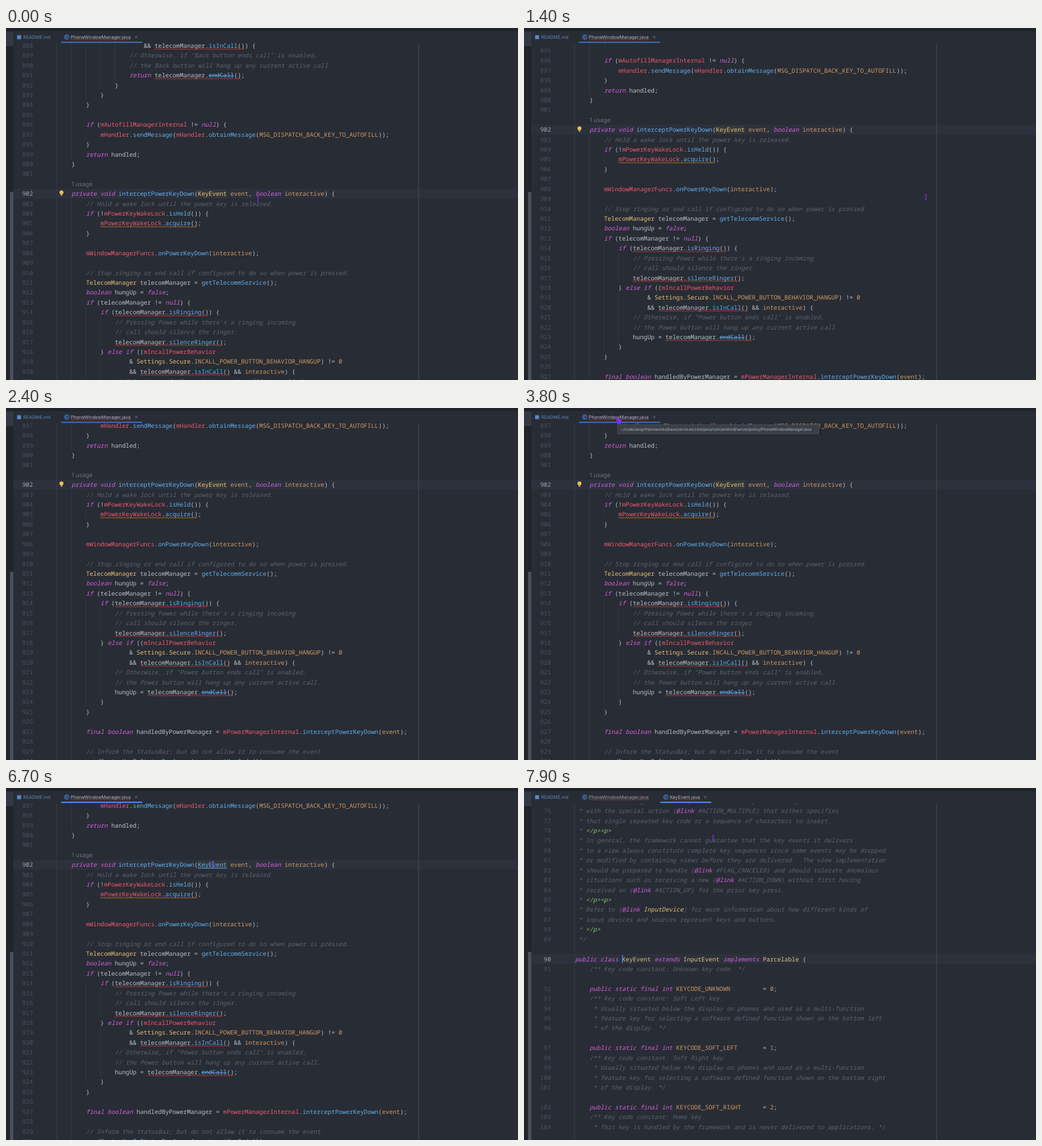
Write an HTML page that moves like this. It is 902 px wide and 621 px high and loops after 8 s.

```html
<!DOCTYPE html>
<html lang="en">
<head>
<meta charset="utf-8">
<title>Code editor</title>
<style>
html, body { margin: 0; width: 100%; height: 100%; overflow: hidden; background: #282c34; }
svg { display: block; width: 902px; height: 621px; text-rendering: geometricPrecision; }
text { white-space: pre; }
.code text { font: 10.6px "Noto Sans Mono", "DejaVu Sans Mono", monospace; }
.ui { font-family: Inter, "Open Sans", sans-serif; }
</style>
</head>
<body>
<svg id="stage" viewBox="0 0 902 621" xmlns="http://www.w3.org/2000/svg"></svg>
<script>
const LOOP = 8000, STEP = 100;
const PITCH = 17.42, CHAR = 6.36, LEFT = 90;
const C = {
  plain: '#bbbfc7', comment: '#5c6370', key: '#d55fde', field: '#ef596f', call: '#61afef',
  type: '#e5c07b', value: '#d19a66', tag: '#89ca78', num: '#495162', current: '#a0a6b0',
  error: '#e0403f', warn: '#e08a1e', guide: '#3a3f48', dark: '#21252b', mouse: '#8b2cf0', caret: '#528bff'
};
const KEYWORDS = new Set(('private public static final void int boolean class extends implements ' +
  'if else return null false').split(' '));

// A leading ~ marks a row without a line number.
const MANAGER = `
                        && telecomManager.isInCall()) {
                    // Otherwise, if "Back button ends call" is enabled,
                    // the Back button will hang up any current active call.
                    return telecomManager.endCall();
                }
            }
        }

        if (mAutofillManagerInternal != null) {
            mHandler.sendMessage(mHandler.obtainMessage(MSG_DISPATCH_BACK_KEY_TO_AUTOFILL));
        }
        return handled;
    }

~1 usage
    private void interceptPowerKeyDown(KeyEvent event, boolean interactive) {
        // Hold a wake lock until the power key is released.
        if (!mPowerKeyWakeLock.isHeld()) {
            mPowerKeyWakeLock.acquire();
        }

        mWindowManagerFuncs.onPowerKeyDown(interactive);

        // Stop ringing or end call if configured to do so when power is pressed.
        TelecomManager telecomManager = getTelecommService();
        boolean hungUp = false;
        if (telecomManager != null) {
            if (telecomManager.isRinging()) {
                // Pressing Power while there's a ringing incoming
                // call should silence the ringer.
                telecomManager.silenceRinger();
            } else if ((mIncallPowerBehavior
                    & Settings.Secure.INCALL_POWER_BUTTON_BEHAVIOR_HANGUP) != 0
                    && telecomManager.isInCall() && interactive) {
                // Otherwise, if "Power button ends call" is enabled,
                // the Power button will hang up any current active call.
                hungUp = telecomManager.endCall();
            }
        }

        final boolean handledByPowerManager = mPowerManagerInternal.interceptPowerKeyDown(event);

        // Inform the StatusBar; but do not allow it to consume the event.
        sendSystemKeyToStatusBarAsync(event.getKeyCode());`;

const KEYS = `
 * When interacting with an IME, the framework may deliver key events
 * with the special action {@link #ACTION_MULTIPLE} that either specifies
 * that single repeated key code or a sequence of characters to insert.
 * </p><p>
 * In general, the framework cannot guarantee that the key events it delivers
 * to a view always constitute complete key sequences since some events may be dropped
 * or modified by containing views before they are delivered.  The view implementation
 * should be prepared to handle {@link #FLAG_CANCELED} and should tolerate anomalous
 * situations such as receiving a new {@link #ACTION_DOWN} without first having
 * received an {@link #ACTION_UP} for the prior key press.
 * </p><p>
 * Refer to {@link InputDevice} for more information about how different kinds of
 * input devices and sources represent keys and buttons.
 * </p>
 */
~
public class KeyEvent extends InputEvent implements Parcelable {
    /** Key code constant: Unknown key code. */
~
    public static final int KEYCODE_UNKNOWN         = 0;
    /** Key code constant: Soft Left key.
     * Usually situated below the display on phones and used as a multi-function
     * feature key for selecting a software defined function shown on the bottom left
     * of the display. */
~
    public static final int KEYCODE_SOFT_LEFT       = 1;
    /** Key code constant: Soft Right key.
     * Usually situated below the display on phones and used as a multi-function
     * feature key for selecting a software defined function shown on the bottom right
     * of the display. */
~
    public static final int KEYCODE_SOFT_RIGHT      = 2;
    /** Key code constant: Home key.
     * This key is handled by the framework and is never delivered to applications. */`;

const stage = document.getElementById('stage');

function el(parent, name, attrs = {}, text) {
  const node = document.createElementNS('http://www.w3.org/2000/svg', name);
  for (const k in attrs) node.setAttribute(k, attrs[k]);
  if (text !== undefined) node.textContent = text;
  return parent.appendChild(node);
}
const rect = (p, x, y, width, height, fill, more) => el(p, 'rect', { x, y, width, height, fill, ...more });
const label = (p, x, y, size, fill, text) => el(p, 'text', { x, y, fill, 'font-size': size, class: 'ui' }, text);
const show = (node, on) => node.setAttribute('display', on ? 'inline' : 'none');
const colX = col => LEFT + col * CHAR;

function wave(p, x, y, width, stroke) {
  let d = `M${x} ${y + 1}`;
  for (let i = 1; i * 2 <= width; i++) d += `l2 ${i % 2 ? -2 : 2}`;
  el(p, 'path', { d, fill: 'none', stroke, 'stroke-width': 0.9 });
}

function wordColor(word, next) {
  if (KEYWORDS.has(word)) return C.key;
  if (/^m[A-Z]/.test(word)) return C.field;
  if (next === '(') return C.call;
  if (/^([A-Z_]{3,}|\d+|event|interactive)$/.test(word)) return C.value;
  return /^[A-Z]/.test(word) ? C.type : C.plain;
}

function noteColor(part) {
  if (part === '@link') return C.key;
  if (part[0] === '<') return C.tag;
  return part === 'InputDevice' ? C.type : C.comment;
}

function addLine(p, line, y) {
  const text = el(p, 'text', { y });
  const note = /^\s*(\/\/|\/?\*)/.test(line);
  const parts = line.match(note ? /@link|<\/?p>|InputDevice|(?:(?!@link|<\/?p>|InputDevice).)+/g : /\w+|\W+/g) || [];
  let col = 0;
  for (const part of parts) {
    const end = col + part.length, lead = part.search(/\S/);
    if (lead >= 0) {
      const fill = note ? noteColor(part) : /\w/.test(part) ? wordColor(part, line[end]) : C.plain;
      const span = el(text, 'tspan', { x: colX(col + lead), fill }, part.slice(lead));
      if (note || fill === C.key) span.setAttribute('font-style', 'italic');
    }
    col = end;
  }
}

function addDoc(p, source, first, current) {
  const g = el(p, 'g', { class: 'code' });
  const lines = source.slice(1).split('\n');
  rect(g, 13, current * PITCH - 8.7, 889, PITCH, '#2c313c');
  let num = first;
  lines.forEach((line, i) => {
    const y = i * PITCH + 3.9;
    if (line[0] === '~') {
      const hint = label(g, colX(4), y, 10.4, '#6b717d', line.slice(1));
      hint.style.font = '10.4px Inter, sans-serif';
      return;
    }
    el(g, 'text', { x: 47.5, y, 'text-anchor': 'end', fill: i === current ? C.current : C.num }, num++);
    addLine(g, line, y);
  });
  return g;
}

// Window frame
rect(stage, 0, 0, 902, 621, '#282c34');
const clip = el(el(stage, 'defs'), 'clipPath', { id: 'pane' });
rect(clip, 0, 27, 902, 594, '#000');
const pane = el(stage, 'g', { 'clip-path': 'url(#pane)' });

// First document
const manager = addDoc(pane, MANAGER, 888, 15);
const ROW = 15 * PITCH;
const guides = [[4, 0, 11], [8, 0, 5], [12, 0, 4], [16, 0, 3], [8, 9, 9], [4, 16, 45],
  [8, 18, 18], [8, 27, 37], [12, 28, 30], [12, 32, 36]];
for (const [col, a, b] of guides)
  rect(manager, colX(col) - 0.5, a * PITCH - 8.7, 1, (b - a + 1) * PITCH, C.guide, { opacity: 0.8 });
const waves = [[0, 27, 25], [3, 27, 24], [18, 12, 27, C.warn], [27, 16, 26], [30, 16, 30], [33, 23, 25], [36, 25, 24]];
for (const [row, col, len, color = C.error] of waves)
  wave(manager, colX(col), row * PITCH + 6.2, len * CHAR, color);
for (const [row, col] of [[3, 42], [36, 40]])
  rect(manager, colX(col), row * PITCH + 0.3, 7 * CHAR, 1, C.call);

const word = [...manager.querySelectorAll('tspan')].find(s => s.textContent === 'KeyEvent');
const shade = rect(manager, colX(39), ROW - 7.5, 8 * CHAR, 15, '#35383a');
manager.insertBefore(shade, manager.children[1]);
const linkLine = rect(manager, colX(39), ROW + 5.4, 8 * CHAR, 1, C.call);
const caret = rect(manager, 363.8, ROW - 7, 1.4, 14, C.caret);

const bulb = el(manager, 'g', { transform: `translate(97.7 ${ROW - 2.2})` });
el(bulb, 'circle', { r: 3.5, fill: '#f0bd4f' });
rect(bulb, -1.7, 2.6, 3.4, 1.5, '#f0bd4f');
rect(bulb, -1.7, 4.7, 3.4, 1.2, '#a9adb5');

// Second document
const keys = addDoc(pane, KEYS, 75, 16);
keys.setAttribute('transform', 'translate(0 22.9)');
rect(keys, 172.8, 16 * PITCH - 7, 1.4, 14, C.caret);

rect(pane, 88.5, 27, 1, 594, C.guide);
rect(pane, 726.5, 27, 1, 594, '#4a4e56');

// Side strip and tabs
rect(stage, 0, 0, 902, 5.5, C.dark);
rect(stage, 0, 5, 13, 616, C.dark);
rect(stage, 0, 6, 13, 26, '#333841');
rect(stage, 7, 289, 6, 332, '#4a4f59');
rect(stage, 19.5, 12.7, 7, 7, '#5688c7');
label(stage, 30.5, 19, 8.05, '#5f88b8', 'README.md');

function addTab(x, name, width) {
  const g = el(stage, 'g', { transform: `translate(${x} 0)` });
  el(g, 'circle', { cx: 10, cy: 16, r: 4.1, fill: '#283a57', stroke: '#4d86d8', 'stroke-width': 0.9 });
  el(g, 'path', { d: 'M11.7 14.7a2.1 2.1 0 1 0 0 2.6', fill: 'none', stroke: '#5f98ea', 'stroke-width': 0.9 });
  const title = label(g, 17, 19, 8.05, '#b4bac4', name);
  wave(g, 17, 20.6, width - 36, '#b8433f');
  const active = el(g, 'g');
  el(active, 'path', { d: `M${width - 12.7} 13.8l4.4 4.4m0-4.4l-4.4 4.4`, stroke: '#7d838e', 'stroke-width': 0.8 });
  const bar = rect(active, 0, 24, width, 2.4, '#4a88ee');
  return { g, title, active, bar };
}
const tabA = addTab(97, 'PhoneWindowManager.java', 143);
const tabB = addTab(240, 'KeyEvent.java', 90);

// Tooltip
const tip = el(stage, 'g');
rect(tip, 166, 31, 359, 17, '#15181d', { opacity: 0.3, rx: 2 });
rect(tip, 164.5, 29.5, 355, 16.5, '#3b3f47', { stroke: '#4b5058', 'stroke-width': 0.8 });
label(tip, 170, 40.3, 6.73, '#b5bac2',
  '~/code/aosp/frameworks/base/services/core/java/com/android/server/policy/PhoneWindowManager.java');

// Mouse
const beam = el(stage, 'path', {
  d: 'M-1.5-4.5Q0-4.5 0-3.4V3.4Q0 4.5-1.5 4.5M1.5-4.5Q0-4.5 0-3.4M0 3.4Q0 4.5 1.5 4.5',
  fill: 'none', stroke: C.mouse, 'stroke-width': 1.3
});
const arrow = el(stage, 'path', {
  d: 'M-4.5-6Q-2-5.5 0-3.5Q4.5-3 5 1Q5 6 .8 6.3Q-3.5 6-3.6 1.8Q-5.2-2-4.5-6Z', fill: C.mouse
});

const MOUSE = [
  [200, 444, 302], [500, 540, 292], [800, 777, 314], [1000, 729, 303], [1100, 729, 303],
  [1200, 729, 302], [1400, 708, 298], [1600, 484, 251], [1700, 484, 251], [1900, 340, 135],
  [2100, 200, 28], [2300, 164, 4], [2400, 164, -20], [2900, 164, -20], [2901, 167, 22.5],
  [5500, 167, 22.5], [5600, 173.5, 26], [5900, 290, 95], [6300, 366, 136], [6400, 366, 136],
  [6500, 368, 136], [6700, 365.2, 136], [7500, 365.2, 136], [7600, 366, 136], [7700, 366, 136],
  [7900, 333.3, 88]
];
const SCROLL = [[1200, 0], [1300, 48], [1400, 113], [1500, 146], [1600, 157]];

function sample(track, t) {
  const i = track.findIndex(k => k[0] >= t);
  if (i === 0) return track[0].slice(1);
  if (i < 0) return track[track.length - 1].slice(1);
  const a = track[i - 1], b = track[i], f = (t - a[0]) / (b[0] - a[0]);
  return a.slice(1).map((v, n) => v + (b[n + 1] - v) * f);
}

function draw(t) {
  const [scroll] = sample(SCROLL, t);
  const [x, y] = sample(MOUSE, t);
  const second = t >= 7000, linked = t >= 6200, focused = t >= 6500;

  manager.setAttribute('transform', `translate(0 ${31 - scroll})`);
  show(manager, !second);
  show(keys, second);
  show(tabA.active, !second);
  show(tabB.g, second);
  tabA.title.setAttribute('fill', second ? '#9aa1ad' : '#b4bac4');
  tabA.bar.setAttribute('fill', focused ? '#4a88ee' : '#3d69b2');

  word.setAttribute('fill', linked ? C.call : C.type);
  show(linkLine, linked);
  show(caret, focused);
  show(bulb, !focused);
  show(tip, t >= 3800 && t < 5700);

  const onTabs = y < 28;
  show(beam, !onTabs);
  show(arrow, onTabs);
  (onTabs ? arrow : beam).setAttribute('transform', `translate(${x} ${y})`);
  arrow.setAttribute('opacity', t >= 3000 && t < 3200 ? (t - 2900) / 300 : 1);
}

const start = performance.now();
function tick() {
  const t = (performance.now() - start) % LOOP;
  draw(Math.floor(t / STEP) * STEP);
  requestAnimationFrame(tick);
}
tick();
</script>
</body>
</html>
```
